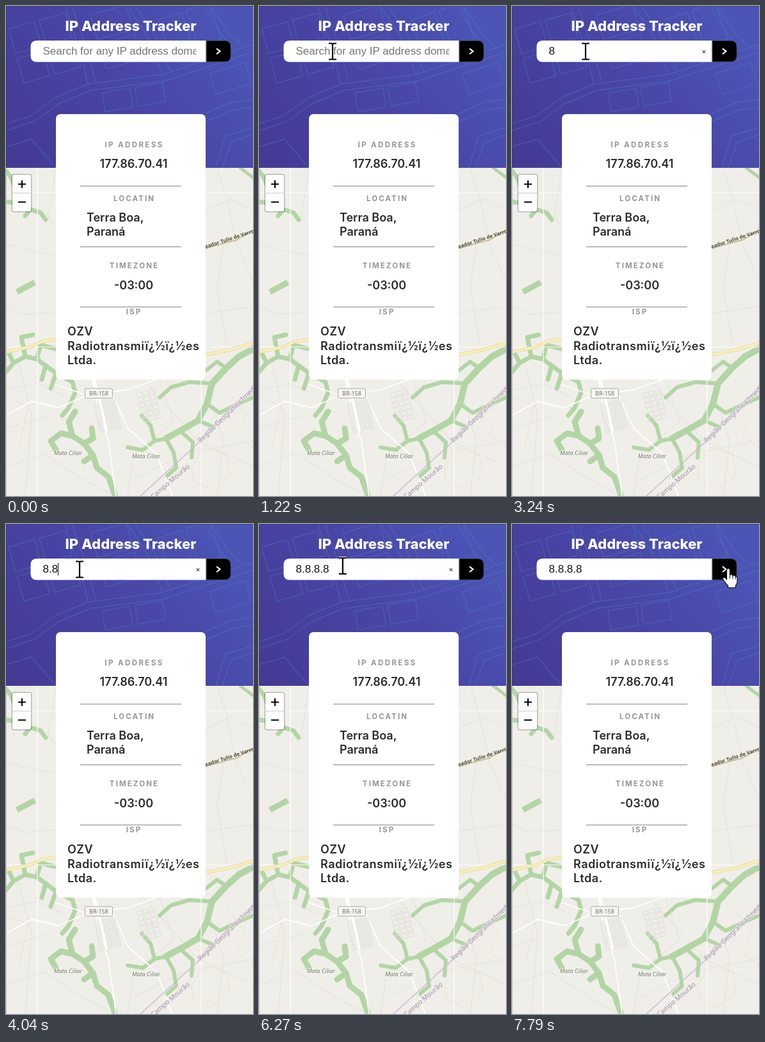
An HTML page that plays this animation: 386 px wide and 766 px high, repeating every 8000 ms.

```html
<!DOCTYPE html>
<html lang="en">
<head>
<meta charset="utf-8">
<title>IP Address Tracker</title>
<style>
html, body { margin: 0; width: 100%; height: 100%; overflow: hidden; background: #f0eee8; }
svg { display: block; width: 386px; height: 766px; }
text { font-family: Inter, sans-serif; }
.title { font-size: 22px; font-weight: 800; fill: #fff; text-anchor: middle; }
.label { font-size: 11.5px; font-weight: 700; fill: #969696; letter-spacing: 2.1px; text-anchor: middle; }
.value { font-size: 18px; font-weight: 600; fill: #2b2b2b; }
.mid { text-anchor: middle; }
.field { font: 17px "Liberation Sans", Arial, sans-serif; }
.place { font: 9px "Noto Sans", sans-serif; }
.area { font-size: 10.5px; }
.line { fill: none; stroke-linecap: round; stroke-linejoin: round; }
.wood { stroke: #b3d5a6; }
.road { stroke: #e4e2dd; stroke-width: 1.1; }
.street { stroke: #fff; stroke-width: 1.8; }
.border { stroke: #cbbcd3; stroke-width: 1.6; }
.track { stroke: #e8dec4; stroke-width: 1; stroke-dasharray: 4 3; }
</style>
</head>
<body>
<svg viewBox="0 0 386 766">
  <defs>
    <linearGradient id="sky" x1="0" y1=".8" x2="1" y2=".3">
      <stop offset="0" stop-color="#453b95"/>
      <stop offset=".5" stop-color="#4845a5"/>
      <stop offset="1" stop-color="#4c55b6"/>
    </linearGradient>
    <clipPath id="head"><rect width="386" height="253"/></clipPath>
    <clipPath id="box"><rect x="55" y="54" width="242.5" height="34"/></clipPath>
  </defs>

  <!-- map -->
  <rect width="386" height="766" fill="#f0eee8"/>
  <g class="line road">
    <path d="M0 372L28 380 78 390M78 253L66 330 78 345M0 470L30 482 78 478M312 320L350 302 386 318M330 253L345 300 360 372 386 430M312 480L386 470M340 372L330 440 345 530"/>
    <path d="M0 600L50 590 90 610M20 560L40 640 30 766M0 660L70 640M0 720L60 700 120 740 170 766M215 584L300 680 386 720M240 584L262 650 200 700 190 766M310 584L340 680 330 766M200 740L280 700 386 680"/>
  </g>
  <path class="line track" d="M290 720L310 690 345 702 350 735 320 755 292 742ZM345 600L375 640 360 670 386 690M0 612L35 625 20 690"/>
  <g class="line wood">
    <path stroke-width="7" d="M0 258L8 268 14 284M0 306L20 309 38 318 54 323 62 334M38 318L30 328"/>
    <path stroke-width="5" d="M366 253L386 268"/>
    <path stroke-width="9" stroke-linecap="butt" d="M17 447L45 432"/>
    <path stroke-width="7" d="M0 572L12 558 30 548 48 552 62 562 78 574 104 588 108 604M30 548L24 518 42 514M48 552L54 530 78 536M62 562L56 584M12 558L4 542M108 604L98 628 88 640M78 574L70 598"/>
    <path stroke-width="9" d="M70 680L86 668 104 672 122 684 136 676 134 660M104 672L98 650 108 634M122 684L136 702 142 722 160 736 170 764M136 702L122 712M70 680L78 694"/>
    <path stroke-width="10" d="M386 536L364 548 344 566 322 590 314 622 300 648 272 664 250 676"/>
    <path stroke-width="6" d="M312 570L330 556 344 566M322 590L286 588 258 596 240 612M314 622L334 636 350 628 386 612M250 676L232 680 214 694 190 690M232 680L226 656 212 640M250 676L262 698 266 722 250 736M272 664L292 682 290 706M300 648L324 658"/>
  </g>
  <g class="line street">
    <path d="M0 292H386M49 253V766M305 584V766M0 533H386" stroke-width="1.2"/>
    <path d="M135 584L146 640 160 680 172 766M78 592L125 608 190 600 235 584M166 606L190 660 235 700 260 766M0 640L40 618 82 628 135 605"/>
  </g>
  <g id="town" class="line" stroke="#e0deda"></g>
  <g class="line">
    <path stroke="#e2d7a2" stroke-width="5" d="M0 541L38 533 58 524 80 521 312 545 348 538 386 527"/>
    <path stroke="#faefb6" stroke-width="3.5" d="M0 541L38 533 58 524 80 521 312 545 348 538 386 527"/>
    <path stroke="#fff" stroke-width="4" d="M138 584L150 632 157 664"/>
    <path stroke="#c9bd9a" stroke-width="2" d="M312 379L340 371 360 366 386 350"/>
    <path class="border" d="M210 766L256 724 304 680 343 637 386 596"/>
  </g>
  <rect x="123.5" y="598" width="43" height="15" rx="2" fill="#f6f5f2" stroke="#aaa9a5"/>
  <text class="place mid" x="145" y="609" font-weight="700" fill="#707070">BR-158</text>
  <g font-style="italic" fill="#6f7c6b" stroke="#f4f3ee" stroke-width="2" paint-order="stroke">
    <text class="place mid" x="97" y="702" style="font-style:italic">Mata Ciliar</text>
    <text class="place mid" x="219" y="707" style="font-style:italic">Mata Ciliar</text>
  </g>
  <g fill="#a28dac" stroke="#f0eee8" stroke-width="1.5" paint-order="stroke">
    <text class="place area" transform="translate(304 683) rotate(-44)">Região Geográfica Imediata</text>
    <text class="place area" transform="translate(230 771) rotate(-41)">Campo Mourão</text>
  </g>
  <text class="place" style="font-size:8px;font-weight:600" fill="#4e4932" transform="translate(312 379) rotate(-18)">eador Tulio de Varros</text>

  <!-- header -->
  <rect width="386" height="253" fill="url(#sky)"/>
  <g id="plan" class="line" clip-path="url(#head)" stroke="#4f86c6" stroke-opacity=".36" stroke-width="1.4">
    <path d="M0 184L38 172 78 143 128 122 245 107 386 60M0 195L45 180 82 153 132 132 248 117 386 72M92 0L117 75 128 122M103 0L128 72 140 118M190 0L220 46 245 107M202 0L232 44 258 104M310 0L336 44 354 66M320 0L348 42 368 62M0 220L40 208 78 253M312 168L350 151 386 146M312 181L354 163 386 158M328 253L343 203 386 190M338 253L352 213 386 201"/>
  </g>
  <path d="M0 .5H386M.5 0V253" stroke="#343575" stroke-opacity=".7"/>
  <path d="M.5 253V766" stroke="#c9c8c4"/>
  <text class="title" x="195" y="39">IP Address Tracker</text>
  <path d="M48 54H313V87.500H48Q38.500 87.500 38.500 78V64Q38.500 54 48 54Z" fill="#fff"/>
  <path d="M313 54.500H342Q351 54.500 351 64V78Q351 87 342 87H313Z" fill="#000" stroke="#33333b" stroke-width=".8"/>
  <path d="M313 54V87.500" stroke="#55565f"/>
  <path d="M329 66.500L334.500 70.800 329 75" fill="none" stroke="#fff" stroke-width="2.1"/>
  <g clip-path="url(#box)"><text id="entry" class="field" x="57.500" y="76"></text></g>
  <path id="clear" d="M297.800 69.300L302.200 73.700M302.200 69.300L297.800 73.700" stroke="#444" stroke-width="1.2"/>
  <rect id="caret" y="61" width="1" height="19.500" fill="#111"/>

  <!-- zoom buttons -->
  <rect x="8.500" y="262.500" width="32" height="60" rx="4" fill="#000" fill-opacity=".23"/>
  <rect x="10" y="264" width="29" height="57" rx="2" fill="#fff"/>
  <path d="M10 292.500H39" stroke="#ccc"/>
  <path d="M19 278.500H31M25 272.500V284.500M19 306.500H31" stroke="#000" stroke-width="2.1"/>

  <!-- details -->
  <rect x="78" y="169" width="234" height="415" rx="7" fill="#fff"/>
  <path d="M116 281.500H274M116 376.500H274M116 470.500H274" stroke="#858585"/>
  <text class="label" x="200.500" y="221" style="letter-spacing:2.4px">IP ADDRESS</text>
  <text class="label" x="200.500" y="305">LOCATIN</text>
  <text class="label" x="200.500" y="410">TIMEZONE</text>
  <text class="label" x="200" y="482">ISP</text>
  <text class="value mid" x="199.500" y="253">177.86.70.41</text>
  <text class="value" x="126" y="337">Terra Boa,</text>
  <text class="value" x="126" y="359">Paraná</text>
  <text class="value mid" x="199.500" y="443">-03:00</text>
  <g style="letter-spacing:.5px">
    <text class="value" x="96" y="515">OZV</text>
    <text class="value" x="96" y="538">Radiotransmiï¿½ï¿½es</text>
    <text class="value" x="96" y="560">Ltda.</text>
  </g>

  <!-- pointers, each with its hot spot at 0,0 -->
  <circle id="ring" r="18" fill="#ff0" fill-opacity=".47"/>
  <g id="pointer">
    <path id="arrow" d="M.5 .5V23L5.800 18 9.500 26.500 13.500 24.800 9.800 16.500H17Z" fill="#fff" stroke="#111" stroke-width="1.1"/>
    <g id="beam" fill="none">
      <path d="M-6-12.500H-2Q0-12.500 0-10.500 0-12.500 2-12.500H6M0-11V11M-6 12.500H-2Q0 12.500 0 10.500 0 12.500 2 12.500H6" stroke="#fff" stroke-width="4"/>
      <path d="M-6-12.500H-2Q0-12.500 0-10.500 0-12.500 2-12.500H6M0-11V11M-6 12.500H-2Q0 12.500 0 10.500 0 12.500 2 12.500H6" stroke="#000" stroke-width="2.2"/>
    </g>
    <g id="hand">
      <path d="M-2.500 2Q-2.500-.5 0-.5T2.500 2V10Q3 8.500 5 9 7 9.500 7 11 8 9.800 9.800 10.500 11.300 11 11.300 12.500 14 11.500 14 14.500V20Q14 24 11.500 26V29.500H-.5V26.500Q-4 23-7.500 17.500-9.500 14.500-7.500 13.500-5.500 12.500-2.500 16.500Z" fill="#fff" stroke="#111" stroke-width="1.2"/>
      <path d="M2.500 10V15M7 11V16M11.300 12.500V16.500" stroke="#111"/>
    </g>
  </g>
</svg>
<script>
const LOOP = 8000, EM = 17;
const $ = id => document.getElementById(id);
const show = (id, on) => $(id).style.display = on ? "" : "none";
const mix = (a, b, k) => a + (b - a) * k;

// Rows of street blocks on a tilted grid
function blocks(id, x, y, angle, cols, rows, w, h, gap) {
  let d = "";
  for (let i = 0; i < cols; i++)
    for (let j = 0; j < rows; j++)
      d += `M${i * (w + gap)} ${j * (h + gap)}h${w}v${h}h${-w}z`;
  $(id).insertAdjacentHTML("beforeend",
    `<path d="${d}" transform="translate(${x} ${y}) rotate(${angle})"/>`);
}
blocks("plan", 4, 36, -16, 2, 2, 42, 40, 8);
blocks("plan", 132, 14, -16, 1, 2, 58, 40, 8);
blocks("plan", 150, 136, -10, 2, 1, 44, 30, 8);
blocks("plan", 238, 22, -19, 2, 1, 38, 60, 8);
blocks("plan", 318, 106, -18, 1, 1, 58, 34, 8);
blocks("town", 138, 622, -12, 5, 8, 5, 4, 2);
blocks("town", 204, 606, -14, 3, 6, 8, 6, 2);

// [time, text, caret visible]
const entries = [
  [0, "", 0], [1420, "", 1], [2020, "", 0], [2540, "", 1],
  [2740, "8", 1], [3240, "8", 0], [3440, "8.", 1], [3840, "8.8", 1],
  [4360, "8.8.", 1], [4660, "8.8.8", 1], [5250, "8.8.8", 0],
  [5360, "8.8.8.", 1], [5650, "8.8.8.8", 1], [6270, "8.8.8.8", 0],
  [6760, "8.8.8.8", 1], [7270, "8.8.8.8", 0]
];

function pointer(t) {
  if (t < 200) return ["", 0, 0];
  if (t < 1100) {
    const k = 1 - (1 - Math.floor((t - 200) / 100) / 8) ** 2;
    const y = mix(395, 62, k);
    return [y < 88 ? "beam" : "arrow", mix(344, 117, k), y];
  }
  if (t < 1220) return ["beam", 116, 67];
  if (t < 6270) {
    const arrow = t >= 3440 && t < 4040 || t >= 4360 && t < 4760 || t >= 5360 && t < 5750;
    return arrow ? ["arrow", 112, 70] : ["beam", 115, 71];
  }
  if (t >= 6860) return ["hand", 338, 70];
  if (t >= 6760) return ["hand", 328.5, 67];
  const k = (Math.floor((t - 6270) / 98) + 1) / 6;
  return ["beam", mix(115, 329, k * k * (3 - 2 * k)), 71 - 11 * Math.sin(k * Math.PI)];
}

function draw(t) {
  const [, text, caret] = entries.findLast(e => e[0] <= t);
  const entry = $("entry");
  entry.textContent = text || "Search for any IP address domain";
  entry.setAttribute("fill", text ? "#111" : "#757575");
  const width = [...text].reduce((sum, c) => sum + (c === "." ? .278 : .556), 0) * EM;
  $("caret").setAttribute("x", Math.round(57 + width));
  show("caret", caret);
  show("clear", text && t < 7570);

  const [kind, x, y] = pointer(t);
  for (const id of ["arrow", "beam", "hand"]) show(id, id === kind);
  $("pointer").setAttribute("transform", `translate(${x} ${y})`);
  const late = t >= 7570;
  show("ring", t >= 1420 && t < 1620 || late && t < 7790);
  $("ring").setAttribute("transform", `translate(${late ? 337 : 112} 70)`);
}

const start = performance.now();
function tick() {
  draw((performance.now() - start) % LOOP);
  requestAnimationFrame(tick);
}
tick();
</script>
</body>
</html>
```
